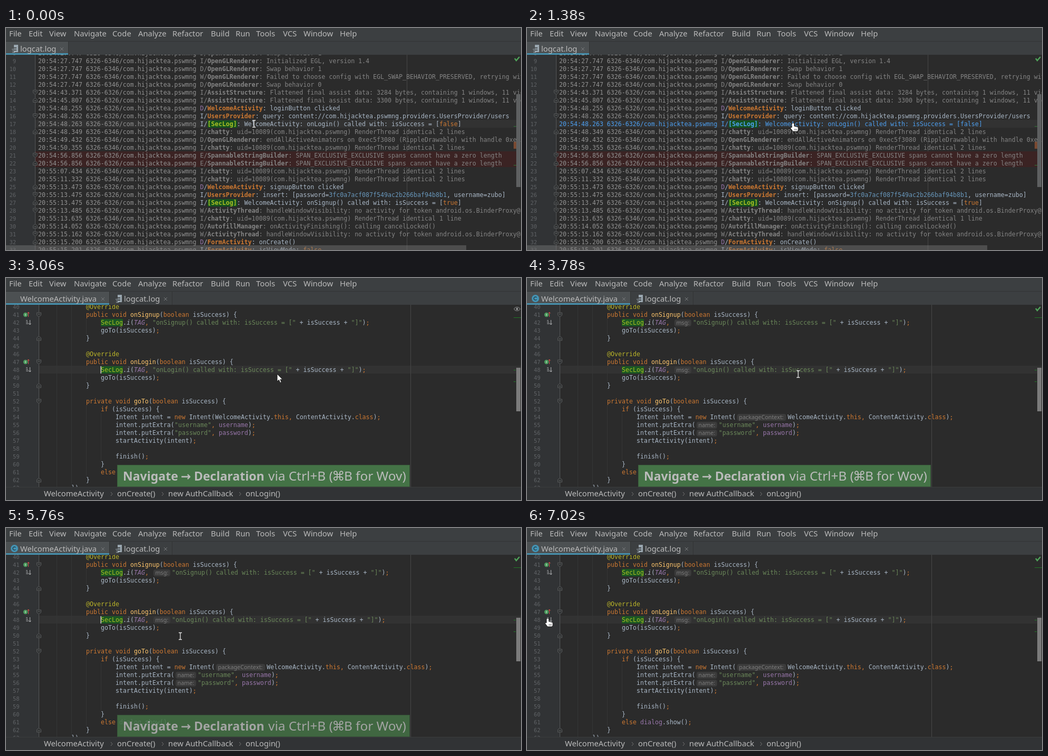
An HTML page for the animation above (8 s loop, 978x423 px).

```html
<!DOCTYPE html>
<html lang="en">
<head>
<meta charset="utf-8">
<title>Jump from log to declaration</title>
<style>
html, body { margin: 0; width: 100%; height: 100%; overflow: hidden; background: #2b2b2b; }
svg { display: block; width: 100vw; height: 100vh; }
text { white-space: pre; font: 14.8px "Noto Sans", "DejaVu Sans", sans-serif; fill: #bbb; }
.mono { font: 11.627px "DejaVu Sans Mono", monospace; fill: #a9b7c6; }
.num { font: 10.4px "DejaVu Sans Mono", monospace; fill: #606366; text-anchor: end; }
.hint { font-size: 10.8px; fill: #7d7d7d; }
.dim { fill: #848484; }
.stamp { fill: #929292; }
.tag { font-weight: bold; }
.key { fill: #cc7832; }
.str { fill: #6a8759; }
.ann { fill: #bbb529; }
.fn { fill: #ffc66d; }
.var { fill: #9876aa; }
.it { font-style: italic; }
.hash { fill: #6897bb; }
.sec { fill: #a8c023; }
.hot, .hot tspan { fill: #4d9ff0; }
.regular { font-size: 24.4px; }
.bold { font-size: 23px; font-weight: bold; }
</style>
</head>
<body>
<svg id="stage" viewBox="0 0 978 423" preserveAspectRatio="none"></svg>
<script>
const LOOP = 8000, STEP = 60, CHAR = 7;

const rect = (x, y, w, h, fill, more = '') =>
  `<rect x="${x}" y="${y}" width="${w}" height="${h}" fill="${fill}" ${more}/>`;
const path = (d, stroke, more = '') => `<path d="${d}" fill="none" stroke="${stroke}" ${more}/>`;
const text = (x, y, s, cls = '', more = '') => `<text x="${x}" y="${y}" class="${cls}" ${more}>${s}</text>`;
const span = (cls, s) => `<tspan class="${cls}">${s}</tspan>`;
const group = (id, body) => `<g id="${id}">${body}</g>`;

const fold = (x, y, up) => {
  const s = up ? -1 : 1;
  return `<path d="M${x - 4} ${y - 4 * s}h8v${5 * s}l-4 ${3 * s}l-4 ${-3 * s}z" fill="#2f3132" stroke="#585a5b"/>` +
    path(`M${x - 2} ${y - s}h4`, '#666869');
};
const check = path('M966 58l3 4l6 -7', '#4fa45a', 'stroke-width="2.4"');
const cross = x => path(`M${x - 3} 37l6 6m0 -6l-6 6`, '#787b7d');

// log view
const LOG = `54:27.747 46 D/OpenGLRenderer: Swap behavior 1
54:27.747 46 I/OpenGLRenderer: Initialized EGL, version 1.4
54:27.747 46 D/OpenGLRenderer: Swap behavior 1
54:27.747 46 W/OpenGLRenderer: Failed to choose config with EGL_SWAP_BEHAVIOR_PRESERVED, retrying without
54:27.747 46 D/OpenGLRenderer: Swap behavior 0
54:43.371 26 I/AssistStructure: Flattened final assist data: 3284 bytes, containing 1 windows, 11 views
54:45.807 26 I/AssistStructure: Flattened final assist data: 3300 bytes, containing 1 windows, 11 views
54:48.255 26 D/WelcomeActivity: loginButton clicked
54:48.262 26 I/UsersProvider: query: content://com.hijacktea.pswmng.providers.UsersProvider/users
54:48.263 26 I/[SecLog]: WelcomeActivity: onLogin() called with: isSuccess = [false]
54:48.349 46 I/chatty: uid=10089(com.hijacktea.pswmng) RenderThread identical 2 lines
54:49.432 46 D/OpenGLRenderer: endAllActiveAnimators on 0xec5f3080 (RippleDrawable) with handle 0xec5
54:50.355 46 I/chatty: uid=10089(com.hijacktea.pswmng) RenderThread identical 2 lines
54:56.856 26 E/SpannableStringBuilder: SPAN_EXCLUSIVE_EXCLUSIVE spans cannot have a zero length
54:56.856 26 E/SpannableStringBuilder: SPAN_EXCLUSIVE_EXCLUSIVE spans cannot have a zero length
55:07.434 46 I/chatty: uid=10089(com.hijacktea.pswmng) RenderThread identical 2 lines
55:11.332 46 I/chatty: uid=10089(com.hijacktea.pswmng) RenderThread identical 2 lines
55:13.473 26 D/WelcomeActivity: signupButton clicked
55:13.475 26 I/UsersProvider: insert: [password=3fc0a7acf087f549ac2b266baf94b8b1, username=zubo]
55:13.475 26 I/[SecLog]: WelcomeActivity: onSignup() called with: isSuccess = [true]
55:13.485 26 W/ActivityThread: handleWindowVisibility: no activity for token android.os.BinderProxy@
55:13.635 46 I/chatty: uid=10089(com.hijacktea.pswmng) RenderThread identical 1 line
55:14.052 26 D/AutofillManager: onActivityFinishing(): calling cancelLocked()
55:15.162 26 W/ActivityThread: handleWindowVisibility: no activity for token android.os.BinderProxy@
55:15.200 26 D/FormActivity: onCreate()
55:15.201 26 I/FormActivity: isViewMode: false`.split('\n');

function logRow(row, i) {
  const n = i + 8, y = 67 + (n - 9) * 15;
  const [, time, pid, level, tag, msg] = row.match(/^(\S+) (\d+) (\w)\/([^:]+)(:.*)$/);
  const own = /Welcome|Users|SecLog|Form/.test(tag), sec = tag[0] === '[';
  const body = own
    ? msg.replace(/[0-9a-f]{32}/, s => span('hash', s)).replace(/true|false/, s => span('key', s))
    : msg;
  const line = span('stamp', `20:${time} 6326-63${pid}/com.hijacktea.pswmng `) +
    span(own && level === 'D' ? 'var' : '', level) + '/' +
    span('tag ' + (sec ? 'sec' : own ? 'key' : ''), tag) + body;
  return (n === 17 ? rect(56, y - 12, 922, 15, '#323232') : '') +
    (level === 'E' ? rect(56, y - 12, 922, 15, '#3b2323') : '') +
    (sec ? rect(383, y - 11, 56, 14, '#15521f') : '') +
    text(19, y, n, 'num') +
    text(61, y, line, own ? 'mono' : 'mono dim', `id="log${n}"`);
}

const logFolds = [13, -14, 16, -18, 21, -22, -25, 26, -27, 28, -30, 31, -32];
const logView = rect(0, 0, 56, 423, '#313335') + path('M55.5 51V423', '#555758') +
  path('M761.5 51V423', '#474747') +
  LOG.map(logRow).join('') +
  logFolds.map(n => fold(55.5, Math.abs(n) * 15 - 72.5, n < 0)).join('') +
  rect(0, 414, 874, 9, '#808080', 'opacity=".4"') + rect(969, 126, 8, 177, '#5e6061') +
  path('M964 187.5h5M964 261.5h5', '#2f7a35') + rect(964, 217, 5, 13, '#7a4a32') + check;

// code view; {label|width} marks a parameter hint
const CODE = `12 @Override
12 public void onSignup(boolean isSuccess) {
16 SecLog.i(TAG, {msg:|37}"onSignup() called with: isSuccess = [" + isSuccess + "]");
16 goTo(isSuccess);
12 }

12 @Override
12 public void onLogin(boolean isSuccess) {
16 SecLog.i(TAG, {msg:|37}"onLogin() called with: isSuccess = [" + isSuccess + "]");
16 goTo(isSuccess);
12 }

12 private void goTo(boolean isSuccess) {
16 if (isSuccess) {
20 Intent intent = new Intent({packageContext:|98}WelcomeActivity.this, ContentActivity.class);
20 intent.putExtra({name:|44}"username", username);
20 intent.putExtra({name:|44}"password", password);
20 startActivity(intent);

20 finish();
16 }
16 else dialog.show();
12 }
8 })`.split('\n');

const TOKENS = [
  ['ann', /@\w+/], ['str', /"[^"]*"/],
  ['key', /\b(?:public|private|void|boolean|if|else|new|this|class)\b|[;,]/],
  ['fn', /\w+(?=\(boolean)/], ['var it', /TAG/], ['var', /\b(?:username|password|dialog)\b/],
  ['sec', /SecLog/], ['it', /\bi(?=\()/]
];
const LEXER = new RegExp(TOKENS.map(t => `(${t[1].source})`).join('|'), 'g');
const paint = s => s.replace(LEXER, (m, ...g) => span(TOKENS[g.findIndex(v => v === m)][0], m));

function codeRow(row, i) {
  const n = i + 40, y = 59.3 + i * 15;
  let out = text(25.5, y, n, 'num');
  if (!row) return out;
  const [, indent, src] = row.match(/^(\d+) (.*)$/);
  const x = 68 + indent * CHAR;
  const [head, label, width, tail] = src.split(/\{(\w+:)\|(\d+)\}/);
  if (head.startsWith('SecLog')) out += rect(x, y - 11.3, 42, 14, '#1b5723');
  out += text(x, y, paint(head), 'mono');
  if (label) {
    const end = x + head.length * CHAR;
    out += `<g class="pill">${rect(end + 2, y - 10.3, width - 5, 13, '#3b3b3b', 'rx="4"')}` +
      text(end + 5.5, y - .5, label, 'hint') + '</g>' +
      text(end, y, paint(tail), 'mono tail', `data-shift="${width}"`);
  }
  return out;
}

const override = y => `<circle cx="37" cy="${y}" r="4.2" fill="#4a9a5c"/>` +
  path(`M37 ${y - 2}v4`, '#dfe9e0') + path(`M42.5 ${y + 4}v-9m-2 2.5l2 -2.5l2 2.5`, '#d0544c');
const logMark = y => path(`M38 ${y - 4}h3M38 ${y - 1}h4M38 ${y + 2}h5M45.5 ${y - 5}v9m-2 -2.5l2 2.5l2 -2.5`, '#b4b6b8');

const codeView = rect(0, 0, 62, 423, '#313335') + rect(62, 167, 916, 15, '#323232') +
  path('M62.5 51V399', '#555758') + path('M768.5 51V399', '#474747') +
  path('M96.5 51V399M124.5 51V392M152.5 77v30M152.5 167v30M152.5 242v135M180.5 257v90', '#353636') +
  CODE.map(codeRow).join('') +
  [70, -115, 160, -205, 235, -385].map(y => fold(62.5, Math.abs(y), y < 0)).join('') +
  override(70) + override(160) + logMark(85) + logMark(175) +
  rect(969, 171, 8, 83, '#7b7b7b') +
  path('M964 75.5h14M964 175.5h4M964 197.5h4', '#1f7a26') +
  group('eye', '<ellipse cx="970.5" cy="59" rx="5.5" ry="3.5" fill="none" stroke="#9a9c9d"/><circle cx="970.5" cy="59" r="2" fill="#9a9c9d"/>') +
  group('ok', check) +
  group('caret', rect(179.5, 168, 1.6, 14, '#ccc')) +
  rect(0, 398, 978, 25, '#313335') + path('M0 398.5H978', '#3a3c3d') +
  [[72, 'WelcomeActivity'], [211, 'onCreate()'], [308, 'new AuthCallback'], [455, 'onLogin()']]
    .map(([x, s]) => text(x, 416, s)).join('') +
  [199, 296, 443].map(x => path(`M${x} 408l3 3.5l-3 3.5`, '#777')).join('') +
  group('banner', rect(211.5, 356.5, 555, 41, '#447346', 'stroke="#3a5c3b"') +
    [[222, 'Navigate'], [332, '→'], [357, 'Declaration']].map(([x, s]) => text(x, 386, s, 'bold')).join('') +
    [[498, 'via Ctrl+B ('], [619, '⌘'], [642, 'B'], [664, 'for Wov)']].map(([x, s]) => text(x, 386, s, 'regular')).join(''));

// window frame
const MENU = [[6, 'File'], [43, 'Edit'], [82, 'View'], [129, 'Navigate'], [202, 'Code'], [251, 'Analyze'],
  [316, 'Refactor'], [389, 'Build'], [436, 'Run'], [475, 'Tools'], [526, 'VCS'], [565, 'Window'], [634, 'Help']];
const logTab = x => `<path d="M${x + 15} 32h8v14h-8v-3h5v-2h-5v-2h5v-2h-5z" fill="#9aa7b0"/>` +
  path(`M${x + 11} 40.5h7M${x + 12} 43.5h6M${x + 12} 46.5h5`, '#9aa7b0') +
  text(x + 27, 45, 'logcat.log') + cross(x + 106);
const activeTab = w => rect(0, 26, w, 25, '#4c5052') + rect(0, 48, w, 3, '#4690ad') + path(`M${w + .5} 26V51`, '#323435');

const bars = rect(0, 0, 978, 51, '#3c3f41') + path('M0 25.5H978', '#323435') +
  MENU.map(([x, s]) => text(x, 16, s)).join('') +
  group('logTabs', activeTab(118) + logTab(0)) +
  group('codeTabs', activeTab(196) + path('M315.5 26V51', '#323435') + logTab(197) +
    text(27, 45, 'WelcomeActivity.java') + cross(184) +
    group('classIcon', '<circle cx="16" cy="39" r="7" fill="#4394b5"/>' +
      path('M18.4 37.2a3 3 0 1 0 0 3.6', '#263f4b', 'stroke-width="1.4"')));

const pointers =
  group('beam', path('M-3 -6.5h2.2l.8 .8l.8 -.8h2.2M0 -6v12M-3 6.5h2.2l.8 -.8l.8 .8h2.2', '#e8e8e8', 'stroke-width="1.3"')) +
  group('hand', '<path d="M-2 1Q-2 -1 .2 -1T2.4 1V5L8.5 6.5Q10 7 10 8.5V12.5L8.5 15H0L-4.5 9Q-4.5 6.5 -2 7.5Z" fill="#fff" stroke="#111" stroke-width=".8"/>' +
    path('M3 10v3M5 10v3M7 10v3', '#444', 'stroke-width=".8"')) +
  group('arrow', '<path d="M0 0V14L3.3 11L5.7 16.5L8 15.5L5.7 10.2H10Z" fill="#fff" stroke="#111" stroke-width=".8"/>');

const stage = document.getElementById('stage');
stage.innerHTML = group('logView', logView) + group('codeView', codeView) + bars + group('pointer', pointers);

const $ = id => document.getElementById(id);
const show = (id, on) => { $(id).style.display = on ? '' : 'none'; };
const pills = stage.querySelectorAll('.pill'), tails = stage.querySelectorAll('.tail');

const HOVER = 1140, JUMP = 2820, ICON = 3180, SETTLED = 3420, HINTS = 3600;
const BLINKS = [3600, 3960, 4620, 5220, 5820, 6300, 6840];
const TRACK = [[0, 471, 182.5], [780, 471, 182.5], [1380, 505, 182], [1560, 513, 182], [1740, 515, 182],
  [2760, 515, 183], [4560, 515, 183], [4860, 506, 188], [5400, 425, 199], [5760, 331, 206],
  [6240, 39, 173], [LOOP, 39, 173]];

const ramp = (t, a, b) => Math.min(1, Math.max(0, (t - a) / (b - a)));
function pointerAt(t) {
  const i = TRACK.findIndex(k => k[0] > t);
  const [t0, x0, y0] = TRACK[i - 1], [t1, x1, y1] = TRACK[i], p = ramp(t, t0, t1);
  return [x0 + (x1 - x0) * p, y0 + (y1 - y0) * p];
}

function draw(t) {
  const code = t >= JUMP, hints = t >= HINTS;
  show('logView', !code);
  show('logTabs', !code);
  show('codeView', code);
  show('codeTabs', code);
  $('log17').classList.toggle('hot', t >= HOVER);
  show('classIcon', t >= ICON);
  show('eye', !hints);
  show('ok', hints);
  pills.forEach(p => { p.style.display = hints ? '' : 'none'; });
  tails.forEach(e => e.setAttribute('transform', `translate(${hints ? e.dataset.shift : 0})`));
  show('caret', BLINKS.filter(b => b <= t).length % 2 === 0);
  $('banner').setAttribute('opacity', ramp(t, JUMP - 60, 3060) * (1 - ramp(t, 5670, 6240)));

  const [x, y] = pointerAt(t);
  const kind = t < HOVER ? 'beam' : !code ? 'hand' : t < SETTLED ? 'arrow' : x < 52 ? 'hand' : x < 62 ? 'arrow' : 'beam';
  for (const k of ['beam', 'hand', 'arrow']) show(k, k === kind);
  $('pointer').setAttribute('transform', `translate(${x} ${y})`);
}

const start = performance.now();
function tick() {
  const t = (performance.now() - start) % LOOP;
  draw(Math.floor(t / STEP) * STEP);
  requestAnimationFrame(tick);
}
tick();
</script>
</body>
</html>
```
